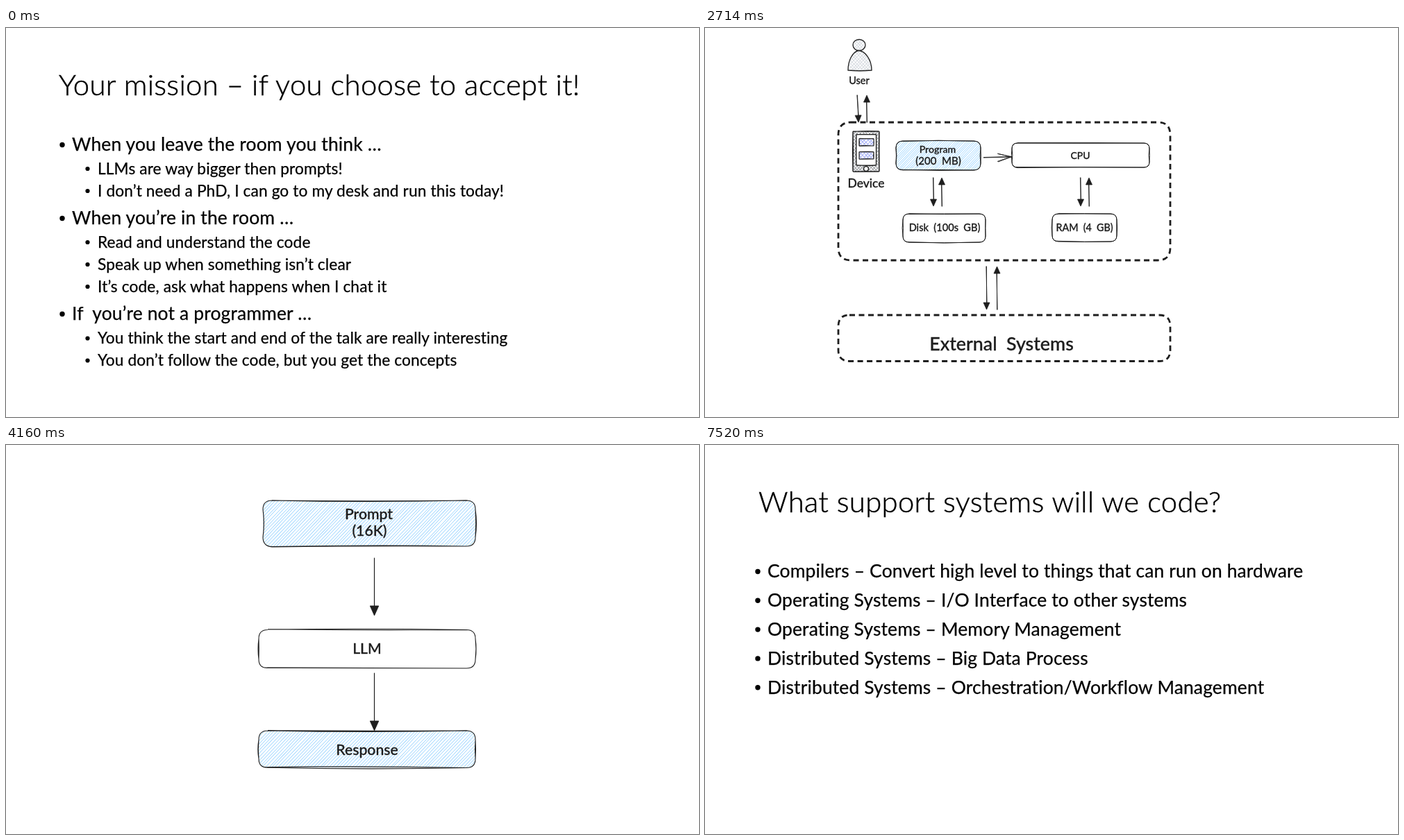
An HTML page that plays this animation: 998x561 px, repeating every 8.36 s.

```html
<!DOCTYPE html>
<html lang="en">
<head>
<meta charset="utf-8">
<title>Slides</title>
<style>
  html, body { margin: 0; width: 100%; height: 100%; overflow: hidden; background: #fff; }
  svg { display: block; width: 100%; height: 100%; }
  text { white-space: pre; font-family: Lato, sans-serif; }
  .title { font-size: 41.8px; font-weight: 300; letter-spacing: .008em; stroke: #000; stroke-width: .5px; }
  .item { letter-spacing: .0055em; stroke: #000; stroke-width: .25px; }
  .hand { font-weight: 500; text-anchor: middle; word-spacing: .25em; stroke-width: .3px; }
  .ask { font: 35px "Liberation Sans", Arial, sans-serif; text-anchor: middle; fill: #f5001d; }
</style>
</head>
<body>
<svg id="stage" viewBox="0 0 998 561"></svg>
<script>
const INK = '#1e1e1e', RED = '#e03131', GREEN = '#2f9e44', BLUE = '#a5d8ff';

let seed = 7;
const random = () => (seed = seed * 16807 % 2147483647) / 2147483647;
const jitter = size => (random() - .5) * 2 * size;
const num = value => +value.toFixed(1);
let clips = 0;

// Slide text
const title = (x, text) => `<text class="title" x="${x}" y="97">${text}</text>`;

function item(x, middle, text, level = 0) {
  const size = level ? 22.7 : 26.45;
  const gap = level ? 14.5 : 14;
  return `<circle cx="${x - gap}" cy="${middle + .5}" r="${level ? 3.1 : 3.7}"/>
    <text class="item" font-size="${size}" x="${x}" y="${middle + size * .355}">${text}</text>`;
}

const hand = (x, middle, size, text, color = INK) =>
  `<text class="hand" font-size="${size}" x="${x}" y="${num(middle + size * .34)}" fill="${color}" stroke="${color}">${text}</text>`;

const ask = (x, middle) => `<text class="ask" x="${x}" y="${middle + 12.4}">???</text>`;

// Sketched shapes
function outline(x1, y1, x2, y2, r, bow = 0) {
  const mx = (x1 + x2) / 2, my = (y1 + y2) / 2;
  const b = () => num(jitter(bow));
  return `M${x1 + r} ${y1 + b() / 3}Q${mx} ${y1 + b()} ${x2 - r} ${y1}Q${x2} ${y1} ${x2} ${y1 + r}` +
    `Q${x2 + b()} ${my} ${x2} ${y2 - r}Q${x2} ${y2} ${x2 - r} ${y2}` +
    `Q${mx} ${y2 + b()} ${x1 + r} ${y2 + b() / 3}Q${x1} ${y2} ${x1} ${y2 - r}` +
    `Q${x1 + b()} ${my} ${x1} ${y1 + r}Q${x1} ${y1} ${x1 + r} ${y1}`;
}

// Slanted double strokes filling the shape given by a path
function hatch(shape, [x1, y1, x2, y2], { color = BLUE, gap = 4, width = .8, cross = false } = {}) {
  const id = 'clip' + clips++, run = (y2 - y1) * .95;
  let lines = '';
  for (let x = x1 - run; x < x2 + run; x += gap) {
    for (let pass = 0; pass < 2; pass++) {
      const at = () => num(x + jitter(gap * .22));
      const far = () => num(x + run + jitter(gap * .22));
      lines += `M${at()} ${y2}L${far()} ${y1}`;
      if (cross) lines += `M${at()} ${y1}L${far()} ${y2}`;
    }
  }
  return `<clipPath id="${id}"><path d="${shape}"/></clipPath>
    <path d="${lines}" clip-path="url(#${id})" stroke="${color}" stroke-width="${width}"/>`;
}

function box(x1, y1, x2, y2, r, { color = INK, width = 1, bow = 2, fill, dash = '' } = {}) {
  const area = fill ? hatch(outline(x1, y1, x2, y2, r), [x1, y1, x2, y2], fill) : '';
  const passes = bow ? 2 : 1;
  let d = '';
  for (let i = 0; i < passes; i++) d += outline(x1, y1, x2, y2, r, bow);
  return `${area}<path d="${d}" fill="none" stroke="${color}" stroke-width="${width}" stroke-dasharray="${dash}"/>`;
}

const frame = (x1, y1, x2, y2, r, options) => box(x1, y1, x2, y2, r, { bow: 0, ...options });

function arrow(x1, y1, x2, y2, { color = INK, width = 1.2, head = [15, 13], dash = '', twin = 0 } = {}) {
  const length = Math.hypot(x2 - x1, y2 - y1);
  const angle = Math.atan2(y2 - y1, x2 - x1) * 180 / Math.PI;
  const [long, wide] = head, neck = length - long + 1;
  const second = twin ? `M0 ${twin}L${neck} ${-twin}` : '';
  return `<g transform="translate(${x1} ${y1}) rotate(${angle.toFixed(2)})" stroke="${color}">
    <path d="M0 0H${num(neck)}${second}" stroke-width="${width}" stroke-dasharray="${dash}" stroke-linecap="round"/>
    <path d="M${num(length)} 0l${-long} ${-wide / 2}v${wide}z" fill="${color}" stroke-width="${width > 3 ? 2 : .8}" stroke-linejoin="round"/></g>`;
}

function user() {
  const head = 'M213 24.5a9 8 0 1 0 18 0a9 8 0 1 0 -18 0z';
  const body = 'M206 61C206 47 212 35 221 32.5C231 33 240 46 240 61Q223 62.5 206 61z';
  const soft = { color: '#ced4da', gap: 4.5, width: .6, cross: true };
  return hatch(head, [213, 16, 231, 33], soft) + hatch(body, [206, 32, 240, 62], soft) +
    `<path d="${head}${body}" fill="none" stroke="${INK}" stroke-width="1.3"/>`;
}

function device() {
  const button = y => box(222, y, 243, y + 10.5, .5, {
    width: 1.2, bow: .7, fill: { color: '#8f9df5', gap: 5, width: .6, cross: true }
  });
  return box(213, 149, 251, 207, 1, {
    width: 1.4, bow: 1, fill: { color: '#70757a', gap: 4.5, width: .5, cross: true }
  }) + '<path d="M218 153.5H246.5V198H218z" fill="#fff"/>' +
    box(218, 153.5, 246.5, 198, 1, { width: 1.3, bow: .7 }) + button(159.5) + button(178.5) +
    `<circle cx="232" cy="203" r="3.4" fill="#fff" stroke="${INK}" stroke-width="1.4"/>`;
}

// Scenes
function mission() {
  return title(76, 'Your mission – if you choose to accept it!') +
    item(95, 168, 'When you leave the room you think …') +
    item(132, 202.5, 'LLMs are way bigger then prompts!', 1) +
    item(132, 234.5, 'I don’t need a PhD, I can go to my desk and run this today!', 1) +
    item(95, 274, 'When you’re in the room …') +
    item(132, 308.5, 'Read and understand the code', 1) +
    item(132, 340.5, 'Speak up when something isn’t clear', 1) +
    item(132, 372.5, 'It’s code, ask what happens when I chat it', 1) +
    item(95, 412, 'If  you’re not a programmer …') +
    item(132, 447, 'You think the start and end of the talk are really interesting', 1) +
    item(132, 479, 'You don’t follow the code, but you get the concepts', 1);
}

function computer() {
  const small = { head: [10, 9], width: .9, twin: .6 };
  const pair = (x, top, bottom, gap) =>
    arrow(x, top, x, bottom, small) + arrow(x + gap, bottom, x + gap, top, small);
  const dashed = { width: 2.8, dash: '8 5.5' };
  return user() + hand(222, 76, 14.5, 'User') +
    arrow(219.5, 97, 221, 136, small) + arrow(233, 136, 233, 97, small) +
    frame(192, 136, 670, 335, 18, dashed) + frame(192, 414, 670, 480.5, 16, dashed) +
    device() + hand(232, 224, 17.5, 'Device') +
    box(275, 163, 397, 205, 10, { fill: { gap: 3.2, width: .7 } }) +
    hand(335, 175, 14.2, 'Program') + hand(336, 191.5, 15, '(200 MB)') +
    `<path d="M401 187L441 186M401 186.5L441 185.5M421 181L441 186L422 193M422 181.5L441 185.5L421 192.5" fill="none" stroke="${INK}" stroke-width=".9"/>` +
    box(442, 166, 640, 201, 8) + hand(540.5, 184, 14, 'CPU') +
    pair(329, 216, 257, 12) + pair(541, 216, 257, 12) +
    box(285, 268, 404, 309, 9) + hand(345, 288, 14.6, 'Disk (100s GB)') +
    box(500, 268, 593, 308, 9) + hand(546.5, 288, 14.3, 'RAM (4 GB)') +
    pair(405.5, 344, 406, 15) + hand(427, 456, 26.8, 'External Systems');
}

function compiler() {
  const red = { color: RED, width: 1.3 };
  const thin = { color: RED, width: 1.1, head: [17, 13] };
  const thick = { color: RED, width: 5, head: [17, 15], dash: '5 10.5' };
  const dark = { width: 1.2, bow: 2 };
  return '<clipPath id="bust"><path d="M0 0H998V46H0z"/></clipPath>' +
    `<g clip-path="url(#bust)">${user()}</g>` +
    box(21, 58, 303, 136, 14, { ...dark, fill: { gap: 5.2, width: 1.1 } }) +
    hand(161.5, 82, 21.5, 'Program') + hand(162, 110, 22.3, '(200 MB)') +
    frame(1, 205, 202, 277.5, 16, red) +
    hand(95, 227, 22, 'Libraries +', RED) + hand(106, 256, 21, 'SDKS', RED) +
    frame(21, 351, 283, 485, 30, red) +
    hand(147, 373, 21, 'Operating System', RED) + hand(157.5, 403, 21.7, '- Disk Access', RED) +
    hand(152, 433, 21.2, '- Network Access', RED) + hand(152, 464, 20.6, '- Virtual Memory', RED) +
    frame(384, 58, 605, 375, 34, red) +
    hand(495, 201, 20.5, 'Compiler/', RED) + hand(494.5, 232, 23, 'Interpreter', RED) +
    frame(666, 58, 968, 162, 25, { ...red, color: GREEN }) +
    hand(810, 90, 28, 'Machine', GREEN) + hand(816.5, 131, 31, 'Instructrion', GREEN) +
    `<circle cx="624.5" cy="156" r="1" fill="${GREEN}"/>` +
    frame(646, 253, 988, 521, 36, { color: RED, width: 1.8, dash: '12 9' }) +
    box(665, 302, 965, 366, 14, dark) + hand(815, 334, 20.5, 'CPU') +
    box(665, 400, 965, 464, 14, dark) + hand(815.5, 432, 21.1, 'Support Hardware') +
    arrow(109, 156, 106, 204, thin) + arrow(227, 137, 218, 331, thin) +
    arrow(102.5, 278, 104, 326, thin) + arrow(767, 181, 766, 301, thin) +
    arrow(827, 300, 827, 180, thin) +
    arrow(323, 132, 365, 157, thick) + arrow(202.5, 229, 366, 229, thick) +
    arrow(284, 366, 365, 320, thick) + arrow(404, 448, 607, 448, thick) +
    arrow(626, 131, 648, 131, { ...thick, dash: '', head: [13, 13] });
}

function pipeline(boxes, labels, arrows, x, size) {
  const fill = { gap: 4.6, width: .8 };
  return boxes.map((b, i) => box(...b, 13, { width: 1.1, bow: 3, fill: i === 1 ? null : fill })).join('') +
    arrows.map(([top, bottom]) => arrow(x, top, x, bottom, { head: [14, 12.5] })).join('') +
    labels.map(([cx, cy, text]) => hand(cx, cy, size, text)).join('');
}

const prompt = () => pipeline(
  [[370, 80, 676, 146], [364, 266.5, 676, 322], [364, 412, 676, 465.5]],
  [[522.5, 100, 'Prompt'], [523.5, 124, '(16K)'], [520, 294, 'LLM'], [520, 440, 'Response']],
  [[163, 246], [329, 412]], 530.5, 21.2);

const questions = () => pipeline(
  [[369, 106, 655, 168], [363, 279.5, 654, 331], [363, 415.5, 654, 465.5]],
  [[511, 125, 'Prompt'], [511.5, 148, '(16K)'], [508, 305, 'LLM'], [508.5, 441, 'Response']],
  [[183, 261], [338, 414.5]], 518.5, 19.7) +
  ask(509.5, 29) + ask(258, 300) + ask(741.5, 300) + ask(509.5, 531);

function support() {
  return title(77, 'What support systems will we code?') + [
    'Compilers – Convert high level to things that can run on hardware',
    'Operating Systems – I/O Interface to other systems',
    'Operating Systems – Memory Management',
    'Distributed Systems – Big Data Process',
    'Distributed Systems – Orchestration/Workflow Management'
  ].map((text, i) => item(90, 182 + i * 41.8, text)).join('');
}

const scenes = [[mission, 2060], [computer, 1090], [compiler, 1010], [prompt, 1090], [questions, 1010], [support, 2100]];
const total = scenes.reduce((sum, [, ms]) => sum + ms, 0);
const stage = document.getElementById('stage');
stage.innerHTML = scenes.map(([draw], i) => `<g opacity="${i ? 0 : 1}">${draw()}</g>`).join('');

let start = 0;
scenes.forEach(([, ms], i) => {
  const end = start + ms;
  const step = (opacity, at) => ({ opacity, offset: at / total, easing: 'step-end' });
  const steps = [step(1, start), step(0, end)];
  if (start > 0) steps.unshift(step(0, 0));
  if (end < total) steps.push(step(0, total));
  stage.children[i].animate(steps, { duration: total, iterations: Infinity, fill: 'both' });
  start = end;
});
</script>
</body>
</html>
```
